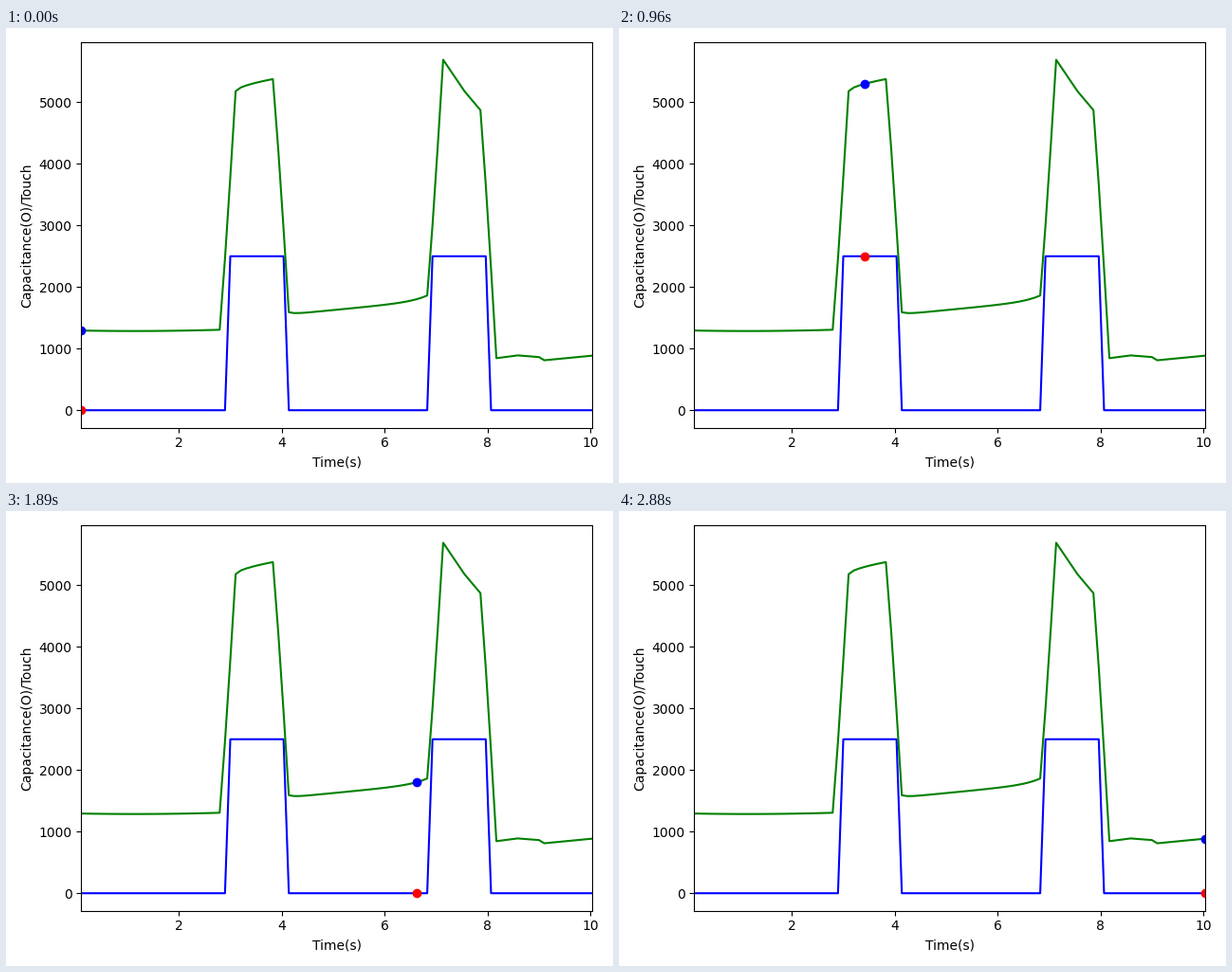
Write a matplotlib script that moves like this. It is 640 by 480 pixels and loops after 2.91 s.

```python
import numpy as np
import matplotlib.pyplot as plt
from matplotlib.animation import FuncAnimation

plt.rcParams["font.family"] = "DejaVu Sans"

SAMPLES = 97
STEP_MS = 30
TOUCH_LEVEL = 2500


def power(i, start, end, low, high, p):
    """Move from low to high between two samples along t ** p."""
    t = np.clip((i - start) / (end - start), 0, 1)
    return low + (high - low) * t ** p


def ramp(i, start, low, high):
    """Three-sample edge of a touch, slightly slow at its start."""
    return power(i, start, start + 3, low, high, 1.1)


def rest(i):
    return 1286 + 0.08 * (i - 10) ** 2


def drift(i):
    settle = 34 * np.exp(39 - i)
    lift = 90 * np.exp((i - 65) / 3)
    return 1565 + 8.3 * (i - 40) + settle + lift


def second_hold(i):
    return np.interp(i, [68, 72, 75], [5690, 5180, 4872])


def tail(i):
    return np.interp(i, [78, 82, 86, 87, 96], [845, 890, 863, 811, 886])


idx = np.arange(SAMPLES)
time = 0.101 + 0.1035 * idx

capacitance = np.select(
    [idx <= 26, idx < 29, idx <= 36, idx < 39, idx <= 65,
     idx < 68, idx <= 75, idx < 78],
    [rest(idx),
     ramp(idx, 26, rest(26), 5180),
     power(idx, 29, 36, 5180, 5376, 0.6),
     ramp(idx, 36, 5376, drift(39)),
     drift(idx),
     ramp(idx, 65, drift(65), 5690),
     second_hold(idx),
     ramp(idx, 75, second_hold(75), tail(78))],
    tail(idx),
)

# Both touches last eleven samples
touch = np.zeros(SAMPLES)
for start in (28, 66):
    touch[start:start + 11] = TOUCH_LEVEL

fig, ax = plt.subplots(figsize=(6.4, 4.8), dpi=100)
ax.plot(time, touch, "b")
ax.plot(time, capacitance, "g")
touch_dot, = ax.plot([], [], "ro")
cap_dot, = ax.plot([], [], "bo")
ax.set_xlim(time[0], time[-1])
ax.set_xlabel("Time(s)")
ax.set_ylabel("Capacitance(O)/Touch")
fig.tight_layout()


def update(i):
    touch_dot.set_data([time[i]], [touch[i]])
    cap_dot.set_data([time[i]], [capacitance[i]])
    return touch_dot, cap_dot


anim = FuncAnimation(fig, update, frames=SAMPLES, interval=STEP_MS,
                     repeat=True, repeat_delay=0)
plt.show()
```
